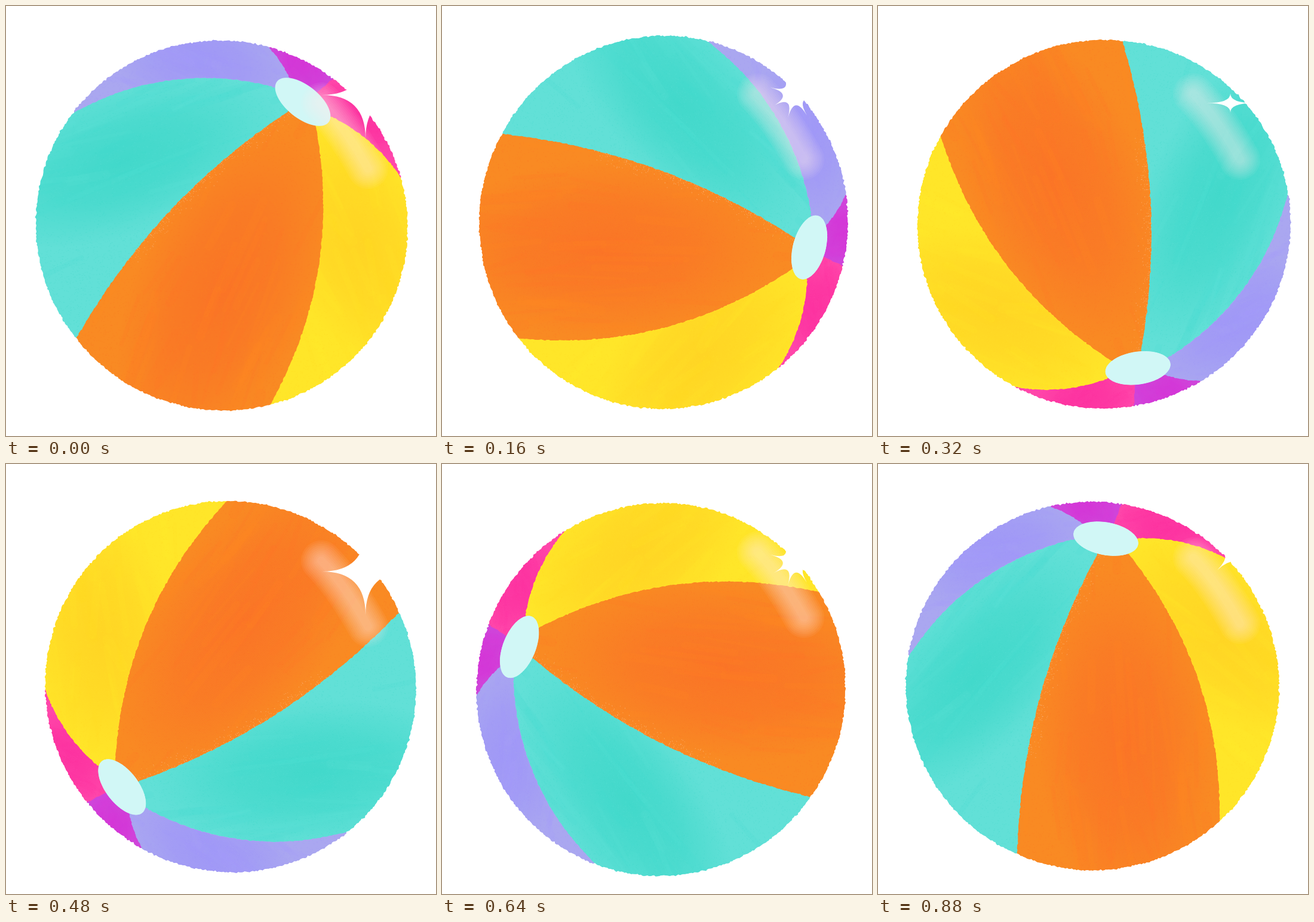
An HTML page with a canvas for the animation above (0.96 s loop, 720x720 px).

```html
<!DOCTYPE html>
<html lang="en">
<head>
<meta charset="utf-8">
<title>Beach ball</title>
<style>
  html, body { margin: 0; width: 100%; height: 100%; overflow: hidden; background: #fff; }
  canvas { display: block; width: 100vw; height: 100vh; }
</style>
</head>
<body>
<canvas id="stage" width="720" height="720"></canvas>
<script>
const SIZE = 720, STEP = 80, STEPS = 12, DETAIL = 2;
const CENTER = [363, 370.5];
const CAP = { x: 497, y: 161, a: 55, b: 27.5, tilt: 38.4 };
const { sin, cos, PI } = Math;
const rad = deg => deg * PI / 180;

let seed = 7;
const rand = () => (seed = (seed * 16807) % 2147483647) / 2147483647;
const spread = size => (rand() + rand() + rand() - 1.5) * size;

// Clockwise panels; each seam has its angle on the rim and its bend
const panels = [
  { base: '#f98a23', tone: '#fa7027', rim: 74.9, bend: 0.18 },
  { base: '#62e0d7', tone: '#3bd7c8', rim: 142.8, bend: -0.12 },
  { base: '#aaa7f0', tone: '#9d94f8', rim: 217.3, bend: -0.2 },
  { base: '#cf45da', tone: '#d434d6', rim: 284.4, bend: -0.08 },
  { base: '#ff46aa', tone: '#fc2d9d', rim: 306.7, bend: 0 },
  { base: '#ffe629', tone: '#ffd123', rim: 344.7, bend: 0.14 }
];

function rimPoint(deg, extra = 0) {
  const r = 310.5 + 3 * cos(rad(deg - 235)) + 2 * cos(rad(2 * (deg - 35))) + extra;
  return [CENTER[0] + r * cos(rad(deg)), CENTER[1] + r * sin(rad(deg))];
}

function capPoint(deg) {
  const u = CAP.a * cos(rad(deg)), v = CAP.b * sin(rad(deg)), t = rad(CAP.tilt);
  return [CAP.x + u * cos(t) - v * sin(t), CAP.y + u * sin(t) + v * cos(t)];
}

// Seams leave the cap evenly spaced and bow sideways on their way to the rim
function seam({ rim, bend }, i) {
  const [x0, y0] = capPoint(40 + 60 * i), [x1, y1] = rimPoint(rim);
  const mx = (x0 + x1) / 2 + bend * (y1 - y0), my = (y0 + y1) / 2 - bend * (x1 - x0);
  const n = Math.ceil(Math.hypot(x1 - x0, y1 - y0) / 3);
  return Array.from({ length: n + 1 }, (_, k) => {
    const t = k / n, s = 1 - t;
    return [s * s * x0 + 2 * s * t * mx + t * t * x1 + spread(0.8),
            s * s * y0 + 2 * s * t * my + t * t * y1 + spread(0.8)];
  });
}
const seams = panels.map(seam);

const trace = (g, pts) => pts.forEach(p => g.lineTo(...p));

function layer() {
  const c = document.createElement('canvas');
  c.width = c.height = SIZE * DETAIL;
  const g = c.getContext('2d');
  g.scale(DETAIL, DETAIL);
  return g;
}

function specks(g, count, color, alpha, place) {
  g.fillStyle = color;
  g.globalAlpha = alpha;
  for (let i = 0; i < count; i++) g.fillRect(...place(), 0.8 + rand() * 1.2, 1);
  g.globalAlpha = 1;
}

// Soft patch of the second tone, then brush strokes and grain along the panel
function paint(g, { base, tone }, from, to) {
  const middle = s => s[s.length >> 1];
  const [p, q] = [middle(from), middle(to)];
  const dx = ((p[0] + q[0]) / 2 - CAP.x) * 1.35, dy = ((p[1] + q[1]) / 2 - CAP.y) * 1.35;
  const long = Math.hypot(dx, dy) * 0.85, wide = Math.hypot(p[0] - q[0], p[1] - q[1]) * 0.55;
  const fade = g.createRadialGradient(0, 0, 0, 0, 0, 1);
  fade.addColorStop(0, tone + 'd0');
  fade.addColorStop(0.5, tone + '90');
  fade.addColorStop(1, tone + '00');

  g.save();
  g.translate(CAP.x + dx, CAP.y + dy);
  g.rotate(Math.atan2(dy, dx));
  g.save();
  g.scale(long, wide);
  g.fillStyle = fade;
  g.fillRect(-1, -1, 2, 2);
  g.restore();
  g.lineCap = 'round';
  for (let i = 0; i < 70; i++) {
    const x = spread(long * 1.3), y = spread(wide * 1.5), half = long * (0.1 + rand() * 0.2);
    g.globalAlpha = 0.1;
    g.strokeStyle = i % 2 ? base : tone;
    g.lineWidth = 4 + rand() * 14;
    g.beginPath();
    g.moveTo(x - half, y);
    g.lineTo(x + half, y + spread(20));
    g.stroke();
  }
  g.restore();
  for (const color of [base, tone])
    specks(g, 18000, color, 0.25, () => [rand() * SIZE, rand() * SIZE]);
}

function drawPanel(g, panel, i) {
  const next = (i + 1) % panels.length, from = seams[i], to = seams[next];
  g.save();
  g.beginPath();
  g.moveTo(CAP.x, CAP.y);
  trace(g, from);
  g.arc(...CENTER, 400, rad(panel.rim), rad(panels[next].rim));
  trace(g, [...to].reverse());
  g.closePath();
  g.fillStyle = g.strokeStyle = panel.base;
  g.fill();
  g.stroke();
  g.clip();
  paint(g, panel, from, to);
  g.restore();
}

function drawBall() {
  const g = layer();
  g.beginPath();
  for (let a = 0; a < 360; a += 0.5) g.lineTo(...rimPoint(a, spread(1.4)));
  g.closePath();
  g.clip();
  panels.forEach((p, i) => drawPanel(g, p, i));

  // dry brush along the upper edge of the orange panel
  const edge = seams[1];
  specks(g, 260, '#fbc08a', 0.5, () => {
    const [x, y] = edge[Math.floor(rand() * edge.length * 0.7)], off = rand() * rand() * 24;
    return [x + off * 0.73, y + off * 0.68];
  });

  g.beginPath();
  for (let a = 0; a < 360; a += 4) g.lineTo(...capPoint(a));
  g.fillStyle = '#d1f7f6';
  g.fill();
  return g.canvas;
}

function drawGloss() {
  const g = layer();
  g.lineCap = 'round';
  g.strokeStyle = '#ffeae4';
  g.globalAlpha = 0.055;
  for (let w = 14; w <= 68; w += 6) {
    g.lineWidth = w;
    g.beginPath();
    g.moveTo(528, 142);
    g.quadraticCurveTo(566, 180, 606, 252);
    g.stroke();
  }
  return g.canvas;
}

// Twinkle cycle, played twice per turn
const twinkles = [
  { rays: 4, reach: 73, turn: 0, flat: 1 },
  { rays: 4, reach: 56, turn: 0, flat: 1 },
  { rays: 8, reach: 42, turn: 15, flat: 1 },
  { rays: 8, reach: 32, turn: 15, flat: 1 },
  { rays: 4, reach: 40, turn: 0, flat: 0.4 },
  { rays: 4, reach: 42, turn: 45, flat: 1 }
];

const ctx = document.getElementById('stage').getContext('2d');
const ball = drawBall(), gloss = drawGloss();

function drawTwinkle({ rays, reach, turn, flat }, x, y) {
  ctx.beginPath();
  for (let k = 0; k <= rays; k++) {
    const a = rad(turn + 360 * k / rays);
    const tip = [x + reach * cos(a), y + reach * flat * sin(a)];
    if (k) ctx.quadraticCurveTo(x, y, ...tip); else ctx.moveTo(...tip);
  }
  ctx.fillStyle = '#fff';
  ctx.fill();
}

function draw(i) {
  const w = 2 * PI * i / STEPS;
  const turn = 30 * i + 7 * (1 - cos(w)) + 2 * (1 - cos(2 * w));

  ctx.clearRect(0, 0, SIZE, SIZE);
  ctx.save();
  ctx.translate(369 - 6 * cos(w) + 4 * sin(w), 370 - 6 * sin(w));
  ctx.rotate(rad(turn));
  ctx.drawImage(ball, -CENTER[0], -CENTER[1], SIZE, SIZE);
  ctx.restore();

  ctx.globalCompositeOperation = 'source-atop';
  ctx.drawImage(gloss, 0, 10 + 10 * cos(2 * w), SIZE, SIZE);
  ctx.globalCompositeOperation = 'source-over';
  drawTwinkle(twinkles[i % twinkles.length],
    594 + 8 * cos(2 * w), 158 - 15.5 * cos(w) + 6.5 * cos(2 * w));
}

let start = null;
function tick(now) {
  if (start === null) start = now;
  draw(Math.floor(Math.max(0, now - start) / STEP) % STEPS);
  requestAnimationFrame(tick);
}
draw(0);
requestAnimationFrame(tick);
</script>
</body>
</html>
```
